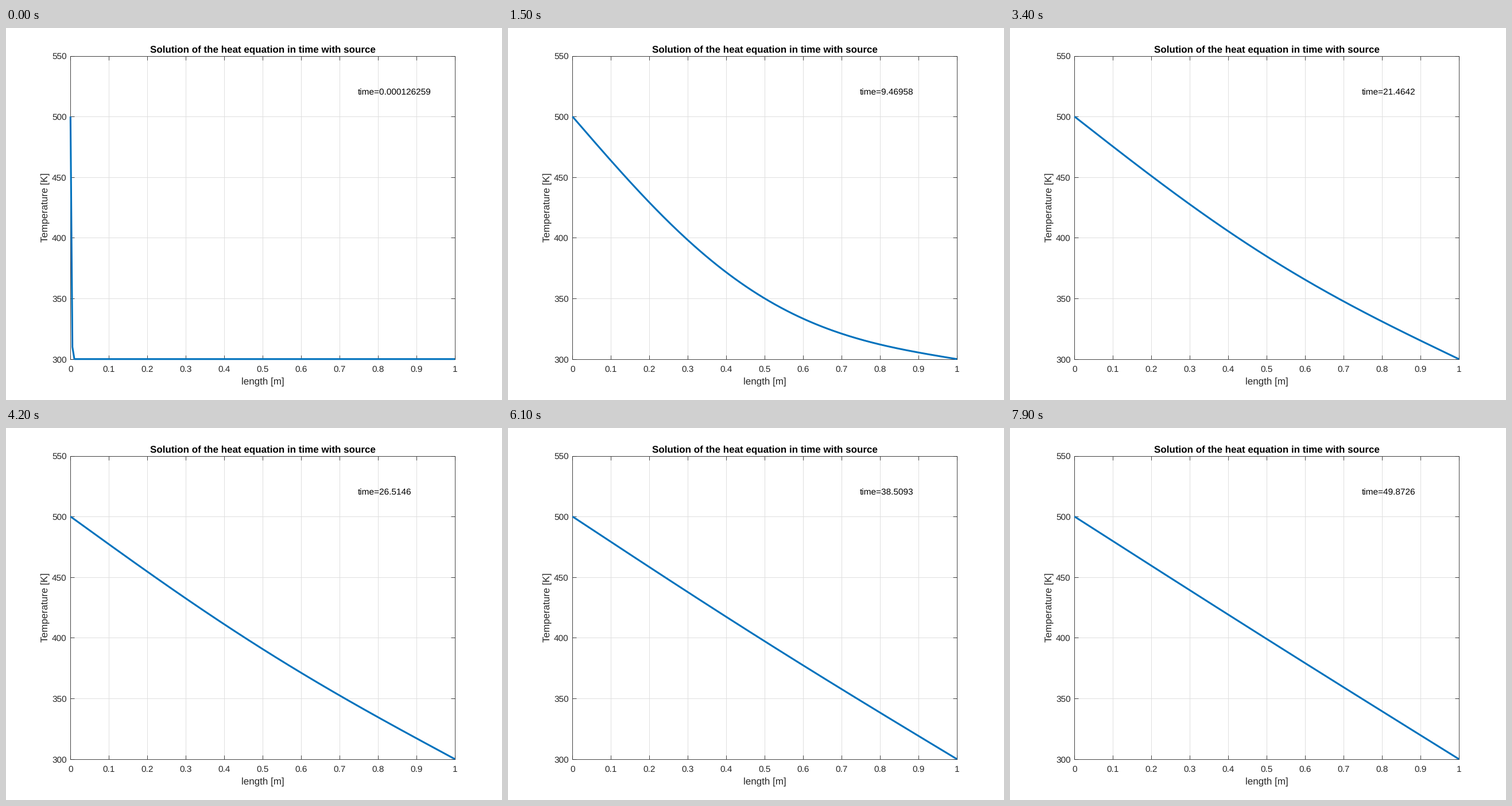
A matplotlib script for the animation above (8 s loop, 864 by 648 pixels).

```python
import numpy as np
import matplotlib.pyplot as plt
from matplotlib.animation import FuncAnimation

WIDTH, HEIGHT, DPI = 864, 648, 72  # at 72 dpi one point is one pixel
FRAMES, INTERVAL = 80, 100
STEPS_PER_FRAME = 5000
PT = WIDTH / 560
INK = "#262626"

plt.rcParams.update({"font.family": "Liberation Sans", "text.hinting": "none"})

# Explicit finite-difference heat equation, advanced in its sine modes
CELLS = 199
DIFFUSIVITY = 0.01
RATIO = 0.05
DT = RATIO / CELLS**2 / DIFFUSIVITY
x = np.linspace(0, 1, CELLS + 1)
steady = 500 - 200 * x
modes = np.arange(1, CELLS)
basis = np.sin(np.pi * np.outer(x, modes))
decay = 1 - 4 * RATIO * np.sin(np.pi * modes / (2 * CELLS)) ** 2
weights = 2 / CELLS * basis[1:-1].T @ (300 - steady[1:-1])


def temperature(step):
    return steady + basis @ (weights * decay**step)


fig = plt.figure(figsize=(WIDTH / DPI, HEIGHT / DPI), dpi=DPI, facecolor="white")
ax = fig.add_axes([0.13, 0.11, 0.775, 0.815])
ax.set(xlim=(0, 1), ylim=(300, 550))
ax.set_xticks(np.arange(11) / 10)
ax.set_yticks(np.arange(300, 551, 50))
ax.set_axisbelow(True)
ax.grid(color="#dfdfdf", linewidth=1)
ax.tick_params(direction="in", length=6.7, width=0.85, color=INK,
               top=True, right=True, labelbottom=False, labelleft=False)
for spine in ax.spines.values():
    spine.set(color=INK, linewidth=0.85)


def label(px, py, text, size=10, color=INK, ha="center", **style):
    return fig.text(px / WIDTH, 1 - py / HEIGHT, text, fontsize=size * PT,
                    color=color, ha=ha, va="baseline", **style)


for i in range(11):
    label(112.3 + 66.96 * i, 598.8, f"{i / 10:g}")
for i in range(6):
    label(105.6, 582.4 - 105.62 * i, str(300 + 50 * i), ha="right")
label(447.2, 42.3, "Solution of the heat equation in time with source",
      11, "black", weight="bold")
label(447.5, 620.3, "length [m]", 11)
fig.text(72.3 / WIDTH, 1 - 312.8 / HEIGHT, "Temperature [K]", fontsize=11 * PT,
         color=INK, rotation=90, rotation_mode="anchor", ha="center", va="baseline")
clock = label(612.4, 117.3, "", color="black", ha="left")
curve, = ax.plot([], [], color="#0072bd", linewidth=2 * PT, clip_on=False,
                 zorder=3, solid_capstyle="butt", solid_joinstyle="round")


def update(frame):
    step = 1 + STEPS_PER_FRAME * frame
    curve.set_data(x, temperature(step))
    clock.set_text(f"time={step * DT:.6g}")
    return curve, clock


animation = FuncAnimation(fig, update, frames=FRAMES, interval=INTERVAL,
                          repeat=True, repeat_delay=0)
plt.show()
```
